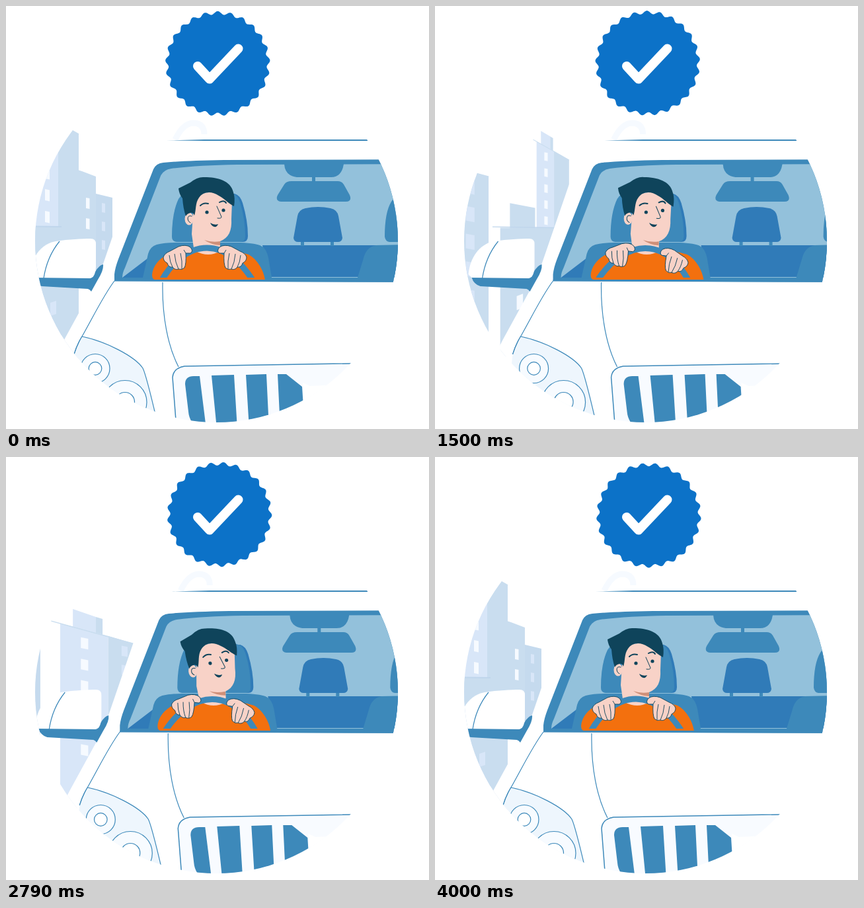
Write an HTML page that moves like this. It is 640 px wide and 640 px high and loops after 4.07 s.

```html
<!DOCTYPE html>
<html lang="en">
<head>
<meta charset="utf-8">
<title>Driver</title>
<style>
html, body { margin: 0; height: 100%; overflow: hidden; background: #fff }
svg { display: block; width: 640px; height: 640px }
.mid { fill: #3d89ba }
.deep { fill: #307bb8 }
.skin { fill: #f8d2c7 }
.hair { fill: #0f445b }
.pale { fill: #f8fbff }
.line { fill: none; stroke: #3d89ba; stroke-width: 1.2 }
.ink { fill: none; stroke: #0f445b; stroke-linecap: round; stroke-linejoin: round }
.shade { fill: #c9ddef }
.light { fill: #d8e6f8 }
.win { fill: #f6faff }
</style>
</head>
<body>
<svg viewBox="0 0 640 640">
<defs>
  <clipPath id="round"><circle cx="318.5" cy="355.5" r="274.5"/></clipPath>
  <clipPath id="aboveSill"><path d="M150 200H640V411H150Z"/></clipPath>
  <g id="hand" stroke="#0f445b" stroke-width=".9" stroke-linejoin="round">
    <path class="skin" d="M238 380Q240 374 248 371L261 364Q272 360 279 365Q284 371 279 374L272 374Q273 390 270 396Q266 400 261 398Q256 400 252 395Q246 396 244 389Q238 386 238 380Z"/>
    <path fill="none" d="M247 377Q248 388 252 395M255 375Q256 388 261 398M264 374Q267 386 266 398M272 374L269 369"/>
  </g>
  <g id="street">
    <!-- wide block that arrives last -->
    <path class="light" d="M-249 122L-180 146V215H-249Z"/>
    <path class="shade" d="M-180 146L-160 152V215H-180Z"/>
    <path class="light" d="M-287 165L-143 203V720H-287Z"/>
    <path class="shade" d="M-143 203L-56 229V640H-143Z"/>
    <path fill="none" stroke="#c9ddef" stroke-width="3" d="M-314 158L-56 229"/>
    <g id="wideWindows"></g>
    <!-- tower with a low annex -->
    <path class="shade" d="M96 244L115 250L136 258V400H96Z"/>
    <path fill="#c5daee" d="M136 284L161 290V400H136Z"/>
    <g id="towerWindows"></g>
    <!-- tall house -->
    <path class="shade" d="M-12 283L40 293V340H-12Z"/>
    <path class="light" d="M52 134L71 145.500V190H52Z"/>
    <path class="shade" d="M71 145.500L77 149V190H71Z"/>
    <path class="light" d="M43 156L79 176V600H43Z"/>
    <path class="shade" d="M79 176L110 194V600H79Z"/>
    <path fill="none" stroke="#c9ddef" stroke-width="1.500" d="M36 152L110 194"/>
    <g id="tallWindows"></g>
    <path class="shade" d="M-32 334H84V600H-32Z"/>
    <path fill="none" stroke="#c0d6ec" stroke-width="2" d="M-48 332L84 334"/>
    <path class="win" d="M2 475L15 470V499L2 504Z"/>
    <path class="light" d="M67 449L76 446V466L67 469Z"/>
  </g>
</defs>

<g clip-path="url(#round)">
  <use id="near" href="#street"/>
  <use id="next" href="#street"/>
  <g id="car">
    <path fill="none" stroke="#f6faff" stroke-width="9" d="M256 202Q268 177 284 177Q300 178 300 194"/>
    <path fill="#fff" d="M202 230L243 203H640V640H20L88 505L128 432L147 390Z"/>
    <path class="mid" d="M242 203.500L300 202H640V204H300Z"/>

    <!-- wing mirror -->
    <path class="mid" d="M41 411H129L135 402Q141 392 147 391Q148 400 139 414L129 432Q127 429 124 428L54 424Q44 421 41 411Z"/>
    <path fill="#fff" d="M36 406C38 382 52 360 75 356C95 353 115 352 128 352Q136 352 136 360V395Q135 411 127 412L41 411Z"/>
    <path class="line" d="M81 356C68 372 60 392 57 412"/>

    <!-- windscreen -->
    <path class="mid" d="M164 416V406Q165 396 170 383L223 247Q227 238 238 237Q270 234 330 233L640 232V418Z"/>
    <path fill="#93c1db" d="M176 411Q176 404 180 396L234 257Q238 248 250 246Q290 241 350 240L640 239V411Z"/>
    <path class="deep" d="M176 411L218 379L208 411ZM388 362H640V410H395Z"/>
    <path class="mid" d="M421 239H511Q508 259 492 259H440Q422 257 421 239ZM463 258H468V266H463ZM432 265H502Q508 265 511 270L520 286Q524 296 514 296H416Q407 295 411 286L421 270Q424 265 432 265Z"/>
    <path class="deep" d="M435 351L441 318Q443 308 453 306Q472 302 491 306Q501 308 503 318L509 351Q508 357 502 357H442Q436 357 435 351Z"/>
    <path class="mid" d="M446 357H451V363H446ZM491 357H496V363H491ZM532 411L542 378Q547 364 560 362L640 360V411ZM573 349Q573 312 583 296Q590 286 610 286H640V357H580Q574 356 573 349Z"/>
    <path class="deep" d="M270 284H346Q354 286 358 298Q366 325 366 348Q366 357 358 357H270Z"/>
    <path class="mid" d="M251 349Q251 313 261 292Q265 284 276 283H340Q350 284 354 297Q362 323 362 348Q362 357 354 357H258Q251 356 251 349ZM207 411L215 375Q218 364 228 361Q240 358 258 358H355Q379 359 386 363Q394 367 397 381L402 411Z"/>

    <!-- driver -->
    <path fill="#f3700e" d="M221 407C222 394 231 382 246 375Q262 370 285 370Q305 380 325 370Q350 370 367 376C381 384 390 400 392 415H229Q221 415 221 407Z"/>
    <path class="skin" d="M284 350H324V371Q306 381 287 371Z"/>
    <g id="head">
      <path class="skin" d="M288 285L283 314L281 345L284 366H324V356C337 351 342 340 341 322L342 296L320 280Z"/>
      <path fill="#cf9079" d="M300 354Q311 358 324 356V362Q310 361 300 354Z"/>
      <ellipse class="skin" cx="277" cy="322" rx="6.500" ry="9.500"/>
      <path class="hair" d="M261 276L279 267Q290 258 300 259C320 259 340 264 344 282Q347 290 345 303C338 300 330 291 322 287C310 279 298 281 292 290C286 298 288 309 285 317Q283 312 279 313Q274 314 272 318Q268 306 267 291Q262 285 261 276Z"/>
      <path class="ink" stroke-width="1" d="M281 318Q275 316 275 322Q275 326 279 328M319 303L326 319Q326 322 320 321"/>
      <path class="ink" stroke-width="2" d="M294 302Q299 297 306 299M323 297Q330 293 333 298"/>
      <path class="hair" d="M309 328Q315 332 321 330Q319 335 315 334Q311 333 309 328Z"/>
      <circle class="hair" cx="304" cy="312" r="2.600"/>
      <circle class="hair" cx="329" cy="309" r="2.600"/>
    </g>
    <g clip-path="url(#aboveSill)">
      <g id="wheel">
        <path fill="none" stroke="#3d89ba" stroke-width="9" d="M232 422C248 390 274 366 304 366C334 366 357 388 378 422"/>
        <use href="#hand"/>
        <use href="#hand" transform="translate(602) scale(-1 1)"/>
      </g>
    </g>
    <path class="mid" d="M164 414H640V418L164 416.500Z"/>

    <!-- bonnet, lamp and grille -->
    <path class="line" d="M164 416C148 437 132 470 115 500Q107 513 103 527M237 418C236 470 245 515 261 546"/>
    <path fill="#eef6fd" d="M115 500C150 507 195 530 207 548Q212 558 227 622L226 640H90L103 527Z"/>
    <path class="line" d="M103 527Q107 513 115 500C150 507 195 530 207 548Q212 558 227 622"/>
    <g class="line" style="fill:#f7fbff">
      <circle cx="135" cy="548.500" r="22"/>
      <circle cx="180" cy="599.500" r="33"/>
    </g>
    <g class="line" style="fill:#fff">
      <circle cx="135" cy="548.500" r="9.800"/>
      <circle cx="180" cy="599" r="14.500"/>
    </g>
    <path class="pale" d="M640 539L270 545Q253 548 252 562L258 640H640Z"/>
    <path class="line" d="M640 539L270 545Q253 548 252 562L258 640" style="stroke-width:1.500"/>
    <path class="mid" d="M271 572Q271 560 284 560H293L303 640H290Q277 628 276 614ZM311 559L345 558L350 640H319ZM363 558L394 557L398 640H368ZM411 557H424L448 576L452 640H415Z"/>
    <path fill="#fff" d="M449 570L460 575L500 573V600L452 610Z"/>
  </g>
</g>

<path id="badge" fill="#0c72c8"/>
<path fill="none" stroke="#fff" stroke-width="14" stroke-linecap="round" stroke-linejoin="round" d="M290 91L308 110.500L351.500 64.500"/>
</svg>
<script>
const get = id => document.getElementById(id);
const FRAMES = 57, LOOP = 4070;

function windows(id, count, cls, x, y, w, h, pitch) {
  for (let i = 0; i < count; i++) {
    const top = y + i * pitch;
    get(id).innerHTML += `<path class="${cls}" d="M${x} ${top}l${w} ${w / 5}v${h}l${-w} ${-w / 5}z"/>`;
  }
}
windows('wideWindows', 6, 'win', -225, 207, 22, 32, 64);
windows('wideWindows', 6, 'light', -103, 232, 18, 30, 57);
windows('towerWindows', 3, 'win', 121, 290, 5.5, 16, 31);
windows('towerWindows', 3, 'light', 145, 298, 5, 14, 28);
windows('tallWindows', 5, 'win', 59, 178, 7, 17, 33);

// scalloped seal with 25 lobes
let seal = '';
for (let i = 0; i < 500; i++) {
  const a = i / 500 * 2 * Math.PI, r = 76.8 + 2.5 * Math.cos(25 * a);
  seal += `${i ? 'L' : 'M'}${(320.3 + r * Math.sin(a)).toFixed(2)} ${(87.1 - r * Math.cos(a)).toFixed(2)}`;
}
get('badge').setAttribute('d', seal + 'Z');

const nod = [[0, 0], [7, 3.2], [16, -1], [26, 2.8], [38, -4], [46, -1], [56, 0]];
function ease(keys, f) {
  const i = Math.max(1, keys.findIndex(k => k[0] >= f));
  const [f0, v0] = keys[i - 1], [f1, v1] = keys[i];
  return v0 + (v1 - v0) * (1 - Math.cos(Math.PI * (f - f0) / (f1 - f0))) / 2;
}

const move = (id, value) => get(id).setAttribute('transform', value);
// the street shrinks towards its vanishing point
const recede = (id, s) => move(id, `translate(458 340) scale(${s}) translate(-458 -340)`);

function draw(now) {
  const f = Math.floor(now % LOOP / LOOP * FRAMES + 0.1) % FRAMES;
  const d = Math.min(1, Math.abs(f - 27.75) / 20.7);
  move('car', `translate(${19.2 * (1 + Math.cos(Math.PI * d)) / 2})`);
  move('head', `rotate(${ease(nod, f)} 305 362)`);
  move('wheel', `rotate(${9.5 * (1 - Math.abs(f - 28) / 28)} 300 420)`);
  move('badge', `rotate(${2.7 * f} 321.7 88.1)`);
  recede('near', 1 - 0.0127 * f);
  get('next').style.display = f > 34 ? '' : 'none';
  if (f > 34) recede('next', 1 / (1 + 0.0158 * (f - 56)));
  get('near').style.display = f < 56 ? '' : 'none';
}

let start;
function tick(now) {
  start ??= now;
  draw(now - start);
  requestAnimationFrame(tick);
}
draw(0);
requestAnimationFrame(tick);
</script>
</body>
</html>
```
